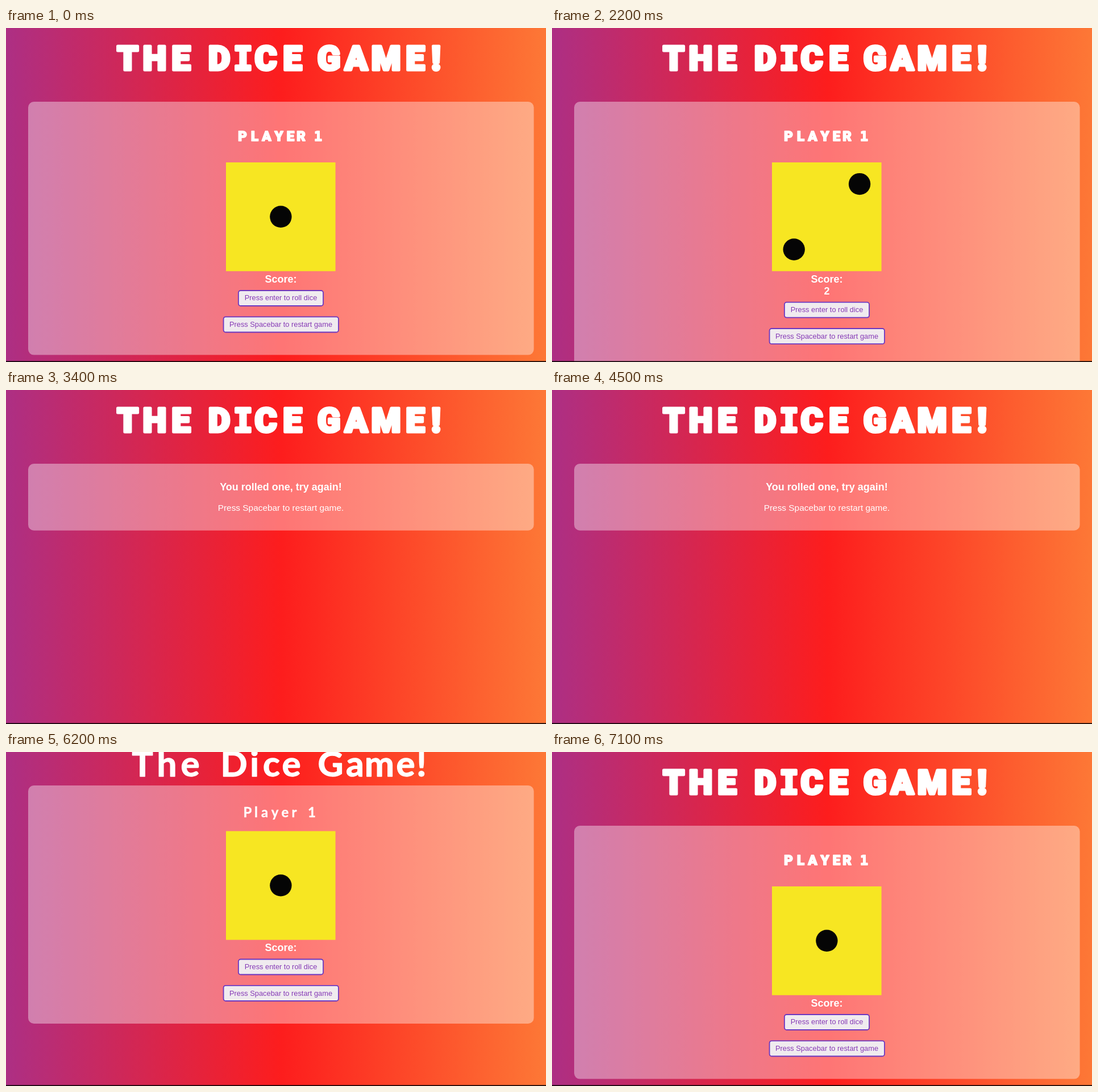
Recreate the animation shown at these times as an HTML page. Size 950 px wide and 589 px high, loop 7200 ms.

```html
<!DOCTYPE html>
<html lang="en">
<head>
<meta charset="utf-8">
<title>The Dice Game</title>
<style>
  html, body { margin: 0; width: 100%; height: 100%; overflow: hidden; }
  svg { display: block; width: 100%; height: 100%; }
  text { font-family: "Liberation Sans", Arial, sans-serif; text-anchor: middle; fill: #fff; }
  .display { font-family: Roboto, Inter, sans-serif; font-weight: 900; stroke: #fff; stroke-linejoin: round; }
  .slab { font-family: "DejaVu Sans Mono", monospace; font-weight: 700; font-size: .97em; }
  .casual { font-family: Lato, "Open Sans", sans-serif; font-weight: 700; stroke: #fff; stroke-linejoin: round; }
  .title { font-size: 59px; stroke-width: 5px; }
  .casual.title { font-size: 62px; stroke-width: 1.4px; }
  .name { font-size: 24px; stroke-width: 1.8px; }
  .casual.name { font-size: 24px; stroke-width: .4px; }
  .head { font-size: 18px; font-weight: 700; }
  .body { font-size: 15.4px; }
  .button rect { fill: #f0ebef; stroke: #6c37bf; stroke-width: 1.8px; }
  .button text { font-size: 12.83px; fill: #863ab6; }
</style>
</head>
<body>
<svg viewBox="0 0 950 589" preserveAspectRatio="none">
  <defs>
    <linearGradient id="sunset" gradientUnits="userSpaceOnUse" x1="0" y1="0" x2="950" y2="0">
      <stop offset="0" stop-color="#ad2f84"/>
      <stop offset=".51" stop-color="#fd1d1d"/>
      <stop offset="1" stop-color="#fd7836"/>
    </linearGradient>
  </defs>
  <rect width="950" height="589" fill="url(#sunset)"/>
  <rect id="card" x="39" width="889.6" rx="10" fill="#fff" fill-opacity=".39"/>

  <text id="title" class="display title" y="73.5"
    x="214 261.5 308 340 375 417 457 504 535 568 616 668.5 720 756.5">THE D<tspan class="slab">I</tspan>CE GAME!</text>
  <text id="plainTitle" class="casual title" y="43"
    x="240 283 324 360 401 437 467 502 533 571 614 657 703 731">The Dice Game!</text>

  <text id="name" class="display name" y="199"
    x="416 437.5 458.5 480 500.5 519 534 549">PLAYER <tspan class="slab">1</tspan></text>
  <text id="plainName" class="casual name" y="115"
    x="425 440 455 473 491 507 522 538">Player 1</text>

  <g id="board">
    <rect x="387" y="237" width="192.6" height="191.8" fill="#f7e622"/>
    <g id="pips" fill="#050505"></g>
    <text class="head" x="483.5" y="448.5">Score:</text>
    <text id="score" class="head" x="483.5" y="469.5"></text>
    <g id="buttons">
      <g class="button">
        <rect x="408.9" y="463" width="149.2" height="27" rx="4"/>
        <text x="483.5" y="480">Press enter to roll dice</text>
      </g>
      <g class="button">
        <rect x="382.6" y="509.3" width="202.4" height="27.2" rx="4"/>
        <text x="483.5" y="527">Press Spacebar to restart game</text>
      </g>
    </g>
  </g>

  <g id="message">
    <text class="head" x="483.5" y="177">You rolled one, try again!</text>
    <text class="body" x="483.5" y="213">Press Spacebar to restart game.</text>
  </g>
  <rect y="587.4" width="950" height="2" fill="#0b0406"/>
</svg>
<script>
const LOOP = 7200;
const $ = id => document.getElementById(id);

const ready = { top: 130, height: 446.6, roll: 1 };
const steps = [
  { at: 0, ...ready },
  { at: 1900, top: 130, height: 468, roll: 2, score: 2 },
  { at: 3400, top: 130, height: 117.7, lost: true },
  { at: 6200, top: 59, height: 420, roll: 1, plain: true, lift: 97.5 },
  { at: 6300, ...ready }
];

// Pip offsets from the centre of the die face.
const faces = { 1: [[0, 0]], 2: [[57.7, -57.7], [-57.7, 57.7]] };

function show(id, on) {
  $(id).style.display = on ? "" : "none";
}

function render(s) {
  $("card").setAttribute("y", s.top);
  $("card").setAttribute("height", s.height);
  show("title", !s.plain);
  show("plainTitle", s.plain);
  show("name", !s.plain && !s.lost);
  show("plainName", s.plain);
  show("board", !s.lost);
  show("message", s.lost);
  $("board").setAttribute("transform", `translate(0 ${-(s.lift || 0)})`);
  $("buttons").setAttribute("transform", `translate(0 ${s.score ? 20.7 : 0})`);
  $("score").textContent = s.score || "";
  $("pips").innerHTML = (faces[s.roll] || [])
    .map(([x, y]) => `<circle cx="${483.4 + x}" cy="${332.8 + y}" r="19.2"/>`)
    .join("");
}

const start = performance.now();
let current;

function tick() {
  const t = (performance.now() - start) % LOOP;
  const step = steps.filter(s => s.at <= t).pop();
  if (step !== current) render(current = step);
  requestAnimationFrame(tick);
}
tick();
</script>
</body>
</html>
```
